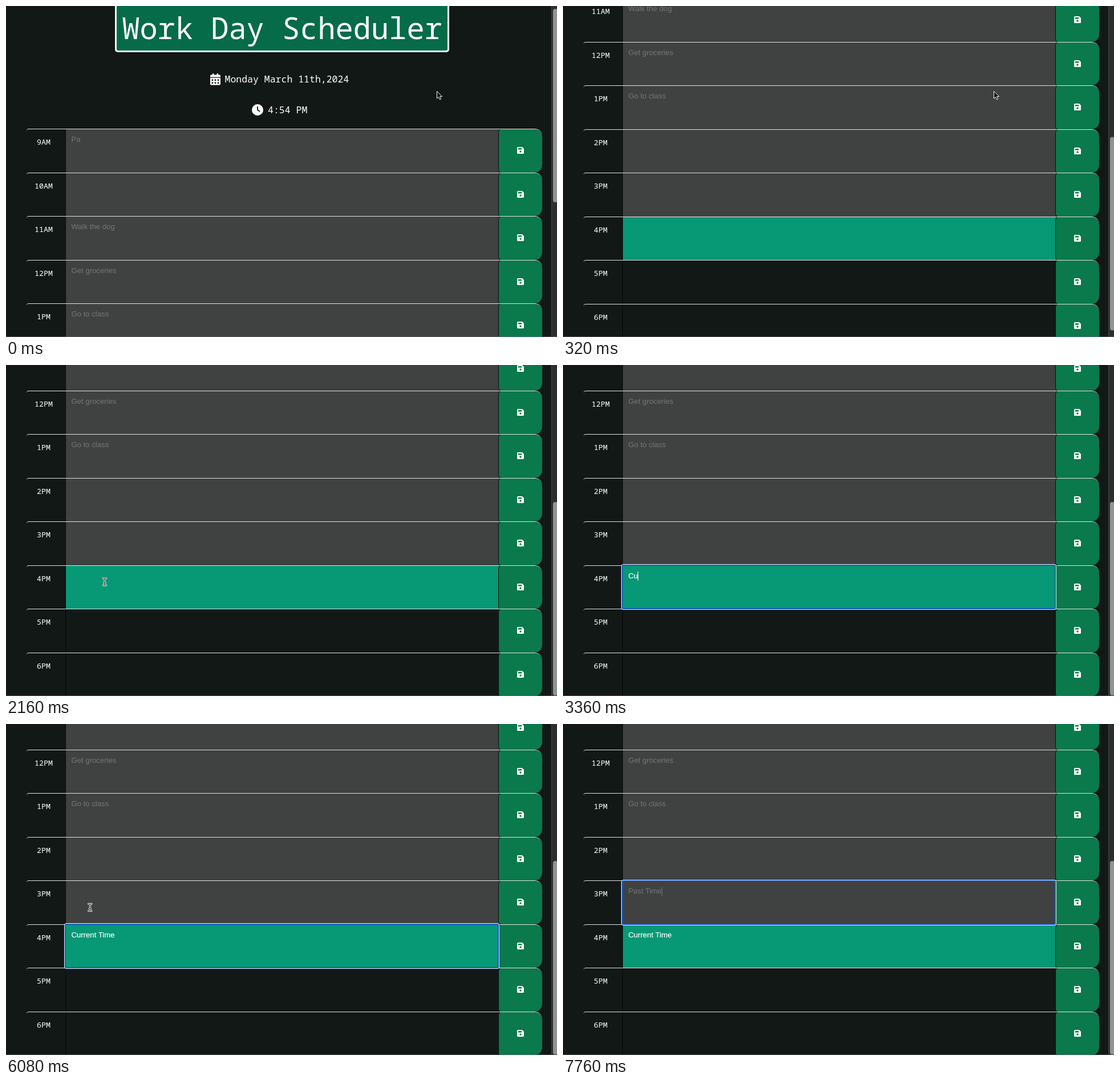
These frames come from a looping animation (966 by 580 pixels, 8 s). An HTML page:

```html
<!DOCTYPE html>
<html lang="en">
<head>
<meta charset="utf-8">
<title>Work Day Scheduler</title>
<style>
  html, body { margin: 0; width: 100%; height: 100%; overflow: hidden; background: #121816; }
  #stage { position: relative; width: 966px; height: 580px; overflow: hidden; color: #fff; font: 16.5px/24px "Noto Sans Mono", monospace; }
  #stage div, #stage svg { position: absolute; box-sizing: border-box; white-space: pre; }
  #page { left: 0; top: 0; width: 956px; height: 980px; }
  #rows { left: 36px; top: 215px; width: 904px; white-space: normal; }
  #title { left: 191px; top: -10px; width: 586px; height: 91px; padding-top: 13px; border: 3px solid #fff; border-radius: 5px; background: #056b49; font-size: 52px; line-height: 64px; text-align: center; }
  .row { left: 0; width: 904px; height: 76.5px; border-top: 1px solid #dfe3e1; border-radius: 4px 13px 13px 4px; overflow: hidden; }
  .hour { left: 0; top: 10px; width: 60px; font-size: 13.3px; font-weight: 500; text-align: center; }
  .task { left: 68px; top: 0; width: 760px; height: 77px; padding: 6px 0 0 9.5px; border-left: 1px solid #050706; font: 13.15px/24px "Liberation Sans", Arial, sans-serif; }
  .past { background: #404141; color: #757676; }
  .present { background: #079875; -webkit-text-stroke: .2px #fff; }
  .save { left: 827px; top: 0; width: 77px; height: 76px; border-left: 1px solid #07110d; border-radius: 5px 13px 13px 5px; background: #0a794c; }
  .save svg { left: 32px; top: 31px; width: 12px; height: 12px; }
  .caret { display: inline-block; width: 1px; height: 16px; margin-right: -1px; background: currentColor; vertical-align: middle; }
  #ring { left: 67px; width: 761px; height: 78px; border: 2px solid #1559c4; border-radius: 3px; box-shadow: 0 0 0 1px #e9f1fb; }
  #track { left: 956px; top: 0; width: 10px; height: 580px; background: #2a2e2d; border-left: 1px solid #454948; }
  #thumb { left: 2px; top: 5px; width: 8px; height: 339px; border-radius: 4px; background: #919392; }
  #edge { left: 0; top: 579px; width: 966px; height: 1px; background: #6b706e; opacity: .55; }
  #arrow, #beam { left: 0; top: 0; overflow: visible; }
</style>
</head>
<body>
<div id="stage">
  <div id="page">
    <div id="title">Work Day Scheduler</div>
    <svg style="left:358px;top:118px" width="18" height="21" fill="#fff">
      <path fill-rule="evenodd" d="M4 1.2a1.2 1.2 0 0 1 2.4 0V2.6h5.2V1.2a1.2 1.2 0 0 1 2.4 0V2.6h2.1A1.9 1.9 0 0 1 18 4.5V6.4H0V4.5A1.9 1.9 0 0 1 1.9 2.6H4zM0 7.7H18V18.6a1.9 1.9 0 0 1-1.9 1.9H1.9A1.9 1.9 0 0 1 0 18.6zM2.6 10.4v2.5h2.6v-2.5zm5.1 0v2.5h2.6v-2.5zm5.1 0v2.5h2.6v-2.5zM2.6 15.5v2.5h2.6v-2.5zm5.1 0v2.5h2.6v-2.5zm5.1 0v2.5h2.6v-2.5z"/>
    </svg>
    <div style="left:383.5px;top:116px">Monday March 11th,2024</div>
    <svg style="left:431px;top:172px" width="20" height="20">
      <circle cx="10" cy="10" r="10" fill="#fff"/>
      <path d="M10 4.7V10l3.6 2.5" fill="none" stroke="#121816" stroke-width="1.9" stroke-linecap="round" stroke-linejoin="round"/>
    </svg>
    <div style="left:459px;top:170px">4:54 PM</div>
    <div id="rows"></div>
  </div>
  <div id="track"><div id="thumb"></div></div>
  <div id="edge"></div>
  <svg id="arrow" width="12" height="18">
    <path d="M.5 .5V13L3.4 10.4 5.4 15 7.6 14 5.6 9.6H9.6Z" fill="#000" stroke="#fff" stroke-linejoin="round"/>
  </svg>
  <svg id="beam" width="1" height="1" fill="none" stroke-linecap="round">
    <defs><path id="bar" d="M-2.8-6.2H-1.3Q0-6.2 0-5 0-6.2 1.3-6.2H2.8M0-5V5M-2.8 6.2H-1.3Q0 6.2 0 5 0 6.2 1.3 6.2H2.8M-1.3 2H1.3"/></defs>
    <use href="#bar" stroke="#fff" stroke-width="2.8"/>
    <use href="#bar" stroke="#111"/>
  </svg>
</div>
<script>
  const LOOP = 8000, STEP = 80, ROW = 76.5;
  const $ = id => document.getElementById(id);
  const hours = ['9AM', '10AM', '11AM', '12PM', '1PM', '2PM', '3PM', '4PM', '5PM', '6PM'];
  const tasks = ['Pa', '', 'Walk the dog', 'Get groceries', 'Go to class'];
  const disk = `<svg viewBox="0 0 12 12" fill="#fff"><path fill-rule="evenodd" d="M1.6 0H9L12 3V10.4A1.6 1.6 0 0 1 10.4 12H1.6A1.6 1.6 0 0 1 0 10.4V1.6A1.6 1.6 0 0 1 1.6 0zM1.8 1.9V4.6H8.2V1.9zM6 6.3a1.7 1.7 0 1 0 0 3.4 1.7 1.7 0 1 0 0-3.4z"/></svg>`;

  $('rows').innerHTML = hours.map((hour, i) => `
    <div class="row" style="top:${i * ROW}px">
      <div class="hour">${hour}</div>
      <div class="task ${i < 7 ? 'past' : i === 7 ? 'present' : ''}">${tasks[i] || ''}</div>
      <div class="save">${disk}</div>
    </div>`).join('') + '<div id="ring"></div>';
  const fields = document.querySelectorAll('.task');

  // [time, value] lists: each value holds until the next time
  const scroll = [[0, 0], [80, 112], [160, 279], [240, 348], [320, 382], [400, 396], [480, 400]];
  const focus = [[0, -1], [2400, 7], [6240, 6]];
  const nowText = [[0, ''], [3200, 'C'], [3360, 'Cu'], [3520, 'Cur'], [3760, 'C'], [3920, 'Cu'], [4160, 'Cur'],
    [4320, 'Curr'], [4400, 'Curre'], [4560, 'Current'], [4720, 'Current '], [4880, 'Current T'],
    [4960, 'Current Ti'], [5040, 'Current Tim'], [5120, 'Current Time']];
  const pastText = [[0, ''], [6880, 'P'], [6960, 'Pa'], [7040, 'Pas'], [7200, 'Past'], [7280, 'Past '],
    [7440, 'Past T'], [7600, 'Past Tim'], [7760, 'Past Time']];
  const caret = [[0, 0], [2400, 1], [3040, 0], [3200, 1], [5440, 0], [6240, 1]];
  const pointer = [[0, 'arrow'], [1200, 'beam'], [3200, ''], [5760, 'beam'], [6880, '']];

  const at = (list, t) => list.reduce((value, [time, next]) => t >= time ? next : value, list[0][1]);
  const ease = (t, from, to) => {
    const p = Math.min(1, Math.max(0, (t - from) / (to - from)));
    return p * p * (3 - 2 * p);
  };

  function cursorPos(t) {
    const a = ease(t, 1120, 2160), b = ease(t, 5680, 6240);
    return [755 - 582 * a - 32 * b, 149 + 231 * (1 - (1 - a) ** 1.6) - 73 * b];
  }

  function setField(i, text, active) {
    const html = text + (active ? '<span class="caret"></span>' : '');
    if (fields[i].dataset.html === html) return;
    fields[i].dataset.html = html;
    fields[i].innerHTML = html;
  }

  function draw(t) {
    const y = at(scroll, t), row = at(focus, t), blink = at(caret, t), shape = at(pointer, t);
    $('page').style.transform = `translateY(${-y}px)`;
    $('thumb').style.transform = `translateY(${y * .5875}px)`;
    $('ring').style.display = row < 0 ? 'none' : 'block';
    $('ring').style.top = row * ROW - .5 + 'px';
    setField(7, at(nowText, t), blink && row === 7);
    setField(6, at(pastText, t), blink && row === 6);
    const [cx, cy] = cursorPos(t);
    for (const id of ['arrow', 'beam']) {
      $(id).style.display = id === shape ? 'block' : 'none';
      $(id).style.transform = `translate(${cx}px, ${cy}px)`;
    }
  }

  const start = performance.now();
  function tick() {
    const t = (performance.now() - start) % LOOP;
    draw(Math.floor(t / STEP) * STEP);
    requestAnimationFrame(tick);
  }
  tick();
</script>
</body>
</html>
```
